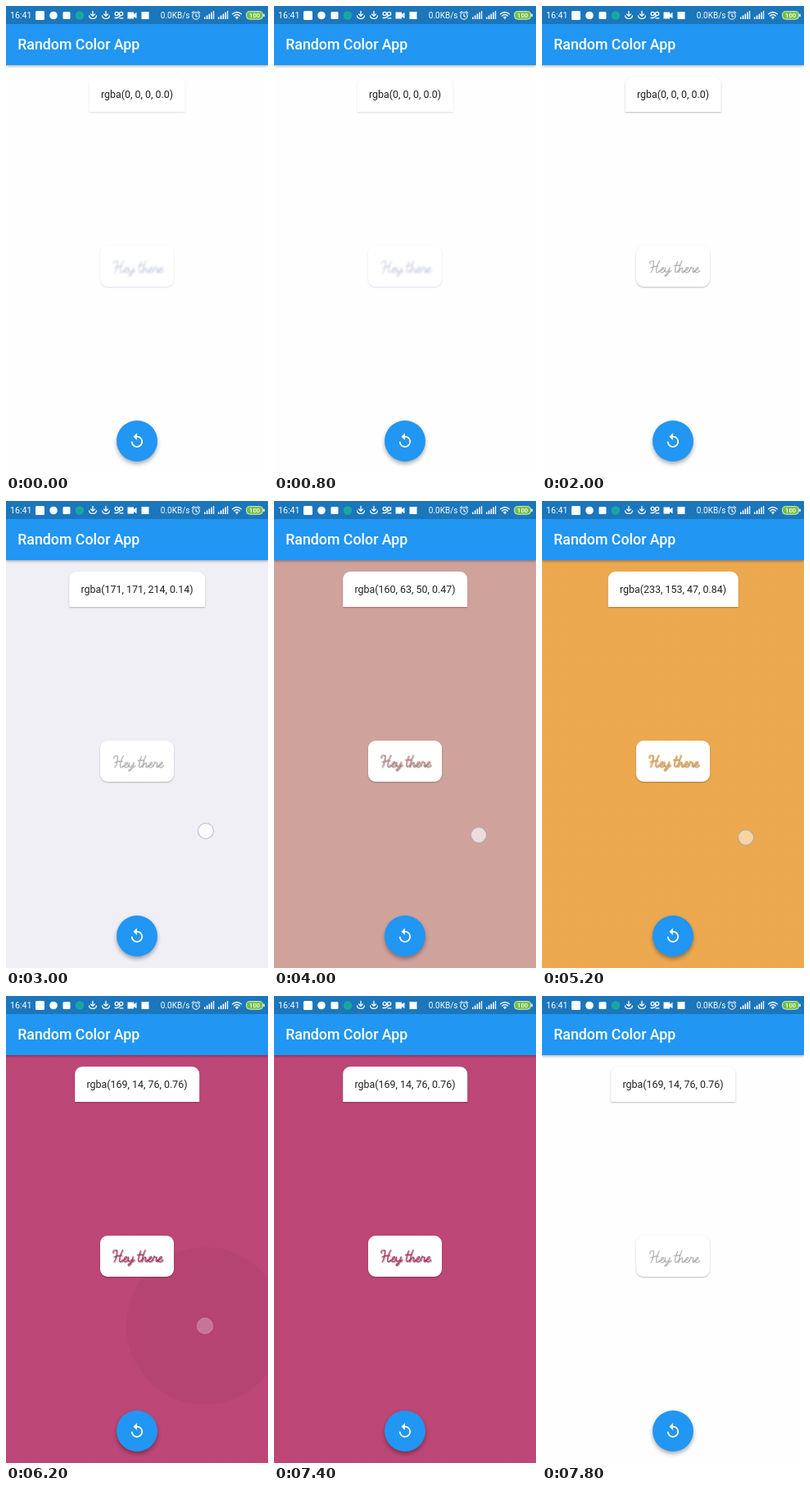
These frames come from a looping animation (320x569 px, 8 s). An HTML page:

```html
<!DOCTYPE html>
<html lang="en">
<head>
<meta charset="utf-8">
<title>Random Color App</title>
<style>
  html, body { margin: 0; width: 100%; height: 100%; overflow: hidden; }
  body { position: relative; background: #fefefe; font-family: Roboto, sans-serif; }
  #page, svg { position: absolute; left: 0; top: 0; width: 320px; height: 569px; overflow: hidden; }
  #bar, .card, #fab, #ripple, #touch { position: absolute; box-sizing: border-box; }
  #bar {
    left: 0; top: 0; width: 320px; height: 72px; padding: 22px 0 0 14.2px;
    background: linear-gradient(#1b76bc 22px, #2196f3 22px);
    box-shadow: 0 1.5px 3px rgba(0, 0, 0, .3);
    color: #fff; font-size: 17.78px; font-weight: 500; line-height: 51px;
  }
  .card { left: 50%; transform: translateX(-50%); background: #fff; white-space: nowrap; }
  #label {
    top: 86px; height: 43px; padding: 0 14.2px; border-radius: 9px 9px 0 0;
    color: #212121; font-size: 12.44px; line-height: 43px;
  }
  #hey {
    top: 292px; width: 90px; height: 50px; border-radius: 9px;
    color: transparent; text-align: center; font: italic 17px/50px cursive;
  }
  #fab {
    left: 135px; top: 505px; width: 50px; height: 50px; border-radius: 50%;
    background: #2196f3; box-shadow: 0 3px 5px rgba(0, 0, 0, .32);
  }
  #ripple, #touch { border-radius: 50%; transform: translate(-50%, -50%); }
  #ripple { width: 192px; height: 192px; background: rgba(0, 0, 0, .037); }
  #touch { width: 20px; height: 20px; border: 1px solid rgba(90, 95, 140, .4); }
  .line { fill: none; stroke: #fff; stroke-width: 1.3; stroke-linecap: round; stroke-linejoin: round; }
  .ink { fill: none; stroke-width: 1.35; stroke-linecap: round; stroke-linejoin: round; }
</style>
</head>
<body>
<div id="page">
  <div id="ripple"></div>
  <div id="label" class="card"></div>
  <div id="hey" class="card">Hey there</div>
  <div id="fab"></div>
  <div id="bar">Random Color App</div>

  <svg viewBox="0 0 320 569">
    <defs>
      <path id="e" d="M142 322C145 321.5 148 319.5 147.5 318C146.8 316.5 143.8 319 143.8 322C143.9 325 147 324 149 321.5"/>
      <g id="script">
        <path d="M131 313C130 310 133 309 135.5 310C135.5 315 134 321 132 324M142.5 309.5C140.5 313 138.5 319 138.5 322.5C138.6 324.5 140.5 324 142 322.5M132 318C135 316 138 316.5 141 316"/>
        <use href="#e"/>
        <path d="M149.5 318C148.8 321 149 323.5 151 323.3C153 323 154.5 320 155.2 317.8C154.5 321 153 326 150.5 328C148.5 329 148.5 327 151 325.5C153.5 324 155.5 323 156.8 321.5"/>
        <path d="M164.5 310.5C163 314 161.5 319 161.5 322C161.7 324.5 164 323.5 165.5 321.5M160.5 315.5L167 315"/>
        <path d="M170 309.5C168 313 166.5 319 165.8 323.8C167 320 169.5 317.5 170.5 318.3C171.3 319.3 169.3 322.5 170.3 323.5C171.3 324 172.5 323 173 322"/>
        <use href="#e" x="30.2"/>
        <path d="M179 321.5C180 319.5 180.8 318 181 317C181.5 318.5 183.5 317.8 184 318.3C183.5 320 182.5 322.5 183.5 323.5C184.5 324 185 323 185.4 322"/>
        <use href="#e" x="42.6"/>
      </g>
      <path id="save" class="line" d="M106 6.5V12M103.6 10L106 12.3L108.4 10M101.6 12C102 16.4 110 16.4 110.4 12"/>
      <path id="bars" d="M242 16V13.5h1.6V16zM244.8 16V11.5h1.6V16zM247.6 16V9.5h1.6V16zM250.4 16V7.5h1.6V16zM253 16V6h1.2V16z"/>
    </defs>

    <use id="shade" class="ink" href="#script" x="1" y="1"/>
    <use id="ink" class="ink" href="#script"/>

    <path fill="#fff" transform="translate(149.3 519.3) scale(.889)" d="M12 5V1L7 6l5 5V7c3.31 0 6 2.69 6 6s-2.69 6-6 6-6-2.69-6-6H4c0 4.42 3.58 8 8 8s8-3.58 8-8-3.58-8-8-8z"/>

    <g fill="#fff">
      <text x="5" y="15.3" font-family="Roboto, sans-serif" font-size="10.7">16:41</text>
      <rect x="36" y="6" width="11" height="11" rx="1.5"/>
      <circle cx="58" cy="11.5" r="4.8"/>
      <rect x="69.5" y="7" width="9" height="9" rx="1.5"/>
      <circle cx="90" cy="11.5" r="5.3" fill="#19a6a0"/>
      <use href="#save"/>
      <use href="#save" x="16"/>
      <g class="line">
        <circle cx="135.2" cy="9.5" r="2.1"/>
        <circle cx="140.6" cy="9.5" r="2.1"/>
        <path d="M133 14.5H136L140 11.6M139 14.8H143"/>
      </g>
      <path d="M148.5 7.5h7.6v2.6l3.4-2.4v7.6l-3.4-2.4v2.6h-7.6z"/>
      <rect x="165.5" y="7" width="9" height="9"/>
      <text x="188.8" y="15.2" font-family="Roboto, sans-serif" font-size="10">0.0KB/s</text>
      <g class="line" style="stroke-width:1.1">
        <circle cx="232" cy="12" r="4.2"/>
        <path d="M232 9.8V12.2L233.6 13.2M227.2 8.4L229.4 6.6M236.8 8.4L234.6 6.6"/>
      </g>
      <use href="#bars"/>
      <use href="#bars" x="17"/>
      <g class="line" style="stroke-width:1.4">
        <path d="M276.6 9.8Q282 5 287.4 9.8M278.6 12Q282 9 285.4 12"/>
      </g>
      <path d="M279.8 13.6Q282 11.8 284.2 13.6L282 16.2z"/>
      <rect x="293.6" y="6.6" width="20" height="9.6" rx="4" fill="#75c043" stroke="#d8ecd0"/>
      <rect x="314.3" y="9.6" width="1.5" height="3.6" rx=".7"/>
      <text x="303.6" y="14.2" text-anchor="middle" font-family="Roboto, sans-serif" font-size="7.6" font-weight="500">100</text>
    </g>
  </svg>
  <div id="touch"></div>
</div>

<script>
  const LOOP = 8000, HOLD = 200, CLEAR = '0, 0, 0, 0.0';

  // [start, page colour, label when it differs]
  const colors = [
    [0, CLEAR],
    [2200, '171, 171, 214, 0.14'],
    [3200, '160, 63, 50, 0.47'],
    [4200, '233, 153, 47, 0.84'],
    [5400, '169, 14, 76, 0.76'],
    [7600, CLEAR, '169, 14, 76, 0.76']
  ];

  // [release time, x, y, pressed opacity]
  const taps = [
    [2200, 244, 402, 0],
    [3200, 244, 402, .75],
    [4200, 250, 407, .62],
    [5400, 249, 410, .5],
    [6200, 243, 402, .4]
  ];

  const $ = id => document.getElementById(id);
  const [label, hey, ripple, touch, ink, shade, page] =
    ['label', 'hey', 'ripple', 'touch', 'ink', 'shade', 'page'].map($);

  function place(el, x, y, shown) {
    el.style.left = x + 'px';
    el.style.top = y + 'px';
    el.style.visibility = shown ? 'visible' : 'hidden';
  }

  function paintColor([, color, text = color], hazy) {
    const c = `rgba(${color})`;
    const shadow = hazy ? 'rgba(70, 80, 180, .18)' : 'rgba(0, 0, 0, .25)';
    page.style.background = color === CLEAR ? '#fefefe' : `linear-gradient(${c}, ${c}), #fafafa`;
    label.textContent = `rgba(${text})`;
    label.style.boxShadow = hey.style.boxShadow = `0 1px 2px ${shadow}`;
    ink.style.stroke = c;
    shade.style.stroke = hazy ? 'rgba(70, 80, 160, .25)' : 'rgba(0, 0, 0, .28)';
    shade.style.filter = `blur(${hazy ? .9 : .45}px)`;
  }

  function paintTap(t) {
    const tap = taps.find(([up]) => t >= up - HOLD && t < up + HOLD);
    const [up, x, y, pressed] = tap || [0, 0, 0, 0];
    const released = tap && t >= up;
    const alpha = released ? .26 : pressed;
    place(ripple, x, y, released);
    place(touch, x, y, tap && alpha);
    touch.style.background = `rgba(255, 255, 255, ${alpha})`;
    touch.style.borderColor = released ? 'rgba(255, 255, 255, .12)' : '';
  }

  let last = -1;
  function draw(now) {
    const t = Math.floor(now % LOOP / HOLD) * HOLD;
    if (t !== last) {
      last = t;
      paintColor(colors.filter(c => c[0] <= t).pop(), t < 1000);
      paintTap(t);
    }
    requestAnimationFrame(() => draw(performance.now() - start));
  }
  const start = performance.now();
  draw(0);
</script>
</body>
</html>
```
